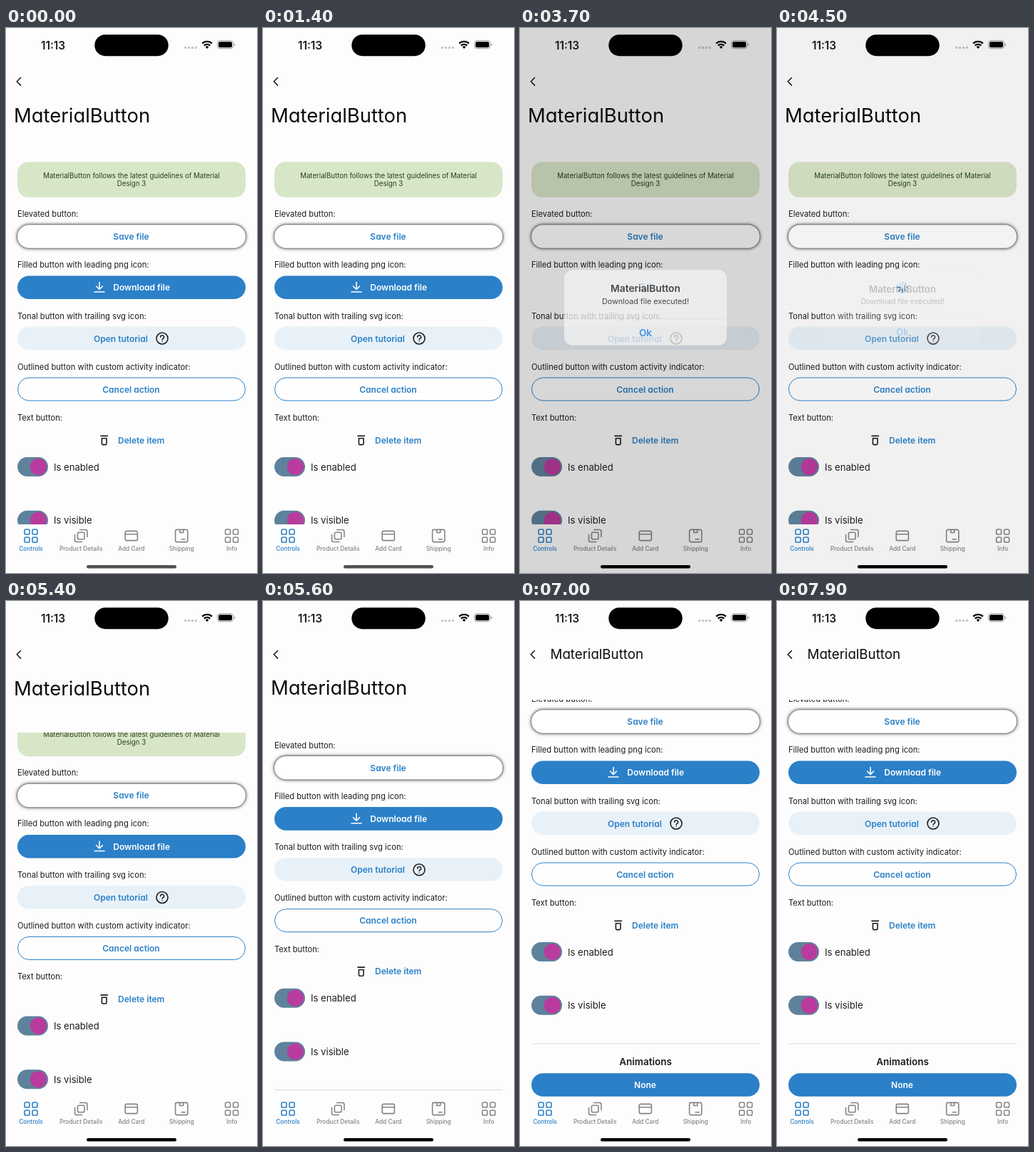
Recreate the animation shown at these times as an HTML page. Size 352 by 762 pixels, loop 8000 ms.

```html
<!DOCTYPE html>
<html lang="en">
<head>
<meta charset="utf-8">
<title>Material button demo</title>
<style>
  html, body { margin: 0; width: 100%; height: 100%; overflow: hidden; background: #fdfdfd; }
  svg { display: block; width: 352px; height: 762px; }
  text { dominant-baseline: central; font-family: Inter, Roboto, sans-serif; fill: #1c1c1e; }
  .mid { text-anchor: middle; }
  .label { font-size: 11.2px; }
  .option { font-size: 13.1px; }
  .brand { font-feature-settings: "cv11"; fill: #0c0c0d; }
  .action { font-size: 12px; font-weight: 600; fill: #2b80c8; font-feature-settings: "cv11"; }
  .note { font-size: 9.7px; fill: #24421a; text-anchor: middle; }
  .white { fill: #fff; }
  .line { fill: none; stroke: #1c1c1e; stroke-width: 1.6; stroke-linecap: round; stroke-linejoin: round; }
  .tab { fill: none; stroke: #858585; stroke-width: 1.6; stroke-linejoin: round; stroke-linecap: round; }
  .tab text { stroke: none; fill: #858585; font-size: 8.3px; font-weight: 500; text-anchor: middle; }
  .tab.on { stroke: #2b80c8; }
  .tab.on text { fill: #2b80c8; }
  .raised { fill: #fff; filter: drop-shadow(0 0 1.2px rgba(0, 0, 0, .6)) drop-shadow(0 0 2.6px rgba(0, 0, 0, .75)); }

  /* Every track shares one 8 s clock. */
  .view, .scroll, .large, .small, .ready, .busy, .dim, .alert, .home { animation: 8s linear infinite; }
  .view { animation-name: view; }
  .scroll { animation-name: scroll; }
  .large { animation-name: large; }
  .small { animation-name: small; }
  .ready { animation-name: ready; animation-timing-function: step-end; }
  .busy { animation-name: busy; animation-timing-function: step-end; }
  .dim { animation-name: fade; }
  .alert { animation-name: fade, zoom; transform-origin: 176px 391px; }
  .home { animation-name: home; }
  .spin { animation: spin 1s steps(8) infinite; transform-origin: 0 0; }

  @keyframes view {
    0%, 70% { clip-path: inset(184px 0 0 0); }
    75%, 100% { clip-path: inset(138px 0 0 0); }
  }
  @keyframes scroll {
    0%, 66.25% { transform: translateY(0); }
    70% { transform: translateY(-58px); animation-timing-function: ease-out; }
    75%, 100% { transform: translateY(-123px); }
  }
  @keyframes large {
    0%, 70% { opacity: 1; transform: translateY(0); }
    73%, 100% { opacity: 0; transform: translateY(-36px); }
  }
  @keyframes small {
    0%, 71.5% { opacity: 0; }
    74%, 100% { opacity: 1; }
  }
  @keyframes ready { 0% { opacity: 1; } 18.75% { opacity: 0; } 60%, 100% { opacity: 1; } }
  @keyframes busy { 0% { opacity: 0; } 18.75% { opacity: 1; } 60%, 100% { opacity: 0; } }
  @keyframes fade {
    0%, 45% { opacity: 0; }
    46.25% { opacity: .77; }
    48.75%, 53.75% { opacity: 1; }
    56.25% { opacity: .23; }
    58.75%, 100% { opacity: 0; }
  }
  @keyframes zoom {
    0%, 45% { transform: scale(.88); }
    46.25% { transform: scale(.942); }
    48.75%, 53.75% { transform: scale(1); }
    56.25% { transform: scale(.906); }
    58.75%, 100% { transform: scale(.88); }
  }
  @keyframes home { 0%, 41.25% { opacity: .68; } 45%, 100% { opacity: 1; } }
  @keyframes spin { to { transform: rotate(360deg); } }
</style>
</head>
<body>
<svg viewBox="0 0 352 762">
  <defs>
    <rect id="pill" x="16" width="320" height="32.6" rx="16.3"/>
    <path id="ray" d="M3.6 0H7.4" stroke="#2b80c8" stroke-width="1.9" stroke-linecap="round"/>
    <g id="switch">
      <rect x="16" y="-13.5" width="43" height="27" rx="13.5" fill="#5f829c"/>
      <circle cx="45.3" r="11.6" fill="#b93b9e"/>
    </g>
    <g id="grid">
      <rect x="-9" y="-9" width="7" height="7" rx="1.8"/>
      <rect x="2" y="-9" width="7" height="7" rx="1.8"/>
      <rect x="-9" y="2" width="7" height="7" rx="1.8"/>
      <rect x="2" y="2" width="7" height="7" rx="1.8"/>
    </g>
  </defs>

  <rect width="352" height="762" fill="#fdfdfd"/>

  <!-- Page content -->
  <g class="view">
    <rect width="352" height="762" fill="#fdfdfd"/>
    <g class="scroll">
      <rect x="16" y="187.3" width="320" height="49.4" rx="15.5" fill="#d8e6c8"/>
      <text class="note" x="176" y="206.5">MaterialButton follows the latest guidelines of Material</text>
      <text class="note" x="176" y="217.5">Design 3</text>

      <text class="label" x="16" y="260">Elevated button:</text>
      <use class="raised" href="#pill" y="275.2"/>
      <text class="action mid" x="175.5" y="291.5">Save file</text>

      <text class="label" x="16" y="331">Filled button with leading png icon:</text>
      <g class="ready">
        <use href="#pill" y="346.4" fill="#2b80c8"/>
        <path d="M131 355.5V365M126.5 361L131 365.5L135.5 361M124 369H138" class="line" style="stroke:#fff"/>
        <text class="action white" x="150.3" y="362.7">Download file</text>
      </g>
      <g class="busy">
        <g transform="translate(176 362.5)">
          <g class="spin">
            <use href="#ray"/>
            <use href="#ray" transform="rotate(-45)" opacity=".85"/>
            <use href="#ray" transform="rotate(-90)" opacity=".7"/>
            <use href="#ray" transform="rotate(-135)" opacity=".55"/>
            <use href="#ray" transform="rotate(-180)" opacity=".43"/>
            <use href="#ray" transform="rotate(-225)" opacity=".35"/>
            <use href="#ray" transform="rotate(-270)" opacity=".3"/>
            <use href="#ray" transform="rotate(-315)" opacity=".25"/>
          </g>
        </g>
      </g>

      <text class="label" x="16" y="402.5">Tonal button with trailing svg icon:</text>
      <use href="#pill" y="417.5" fill="#e8f1f8"/>
      <text class="action" x="123" y="434">Open tutorial</text>
      <circle class="line" cx="219" cy="434" r="8"/>
      <path class="line" style="stroke-width:1.5" d="M216.6 432.2a2.5 2.4 0 1 1 3.7 2q-1.2.7-1.2 1.7M219.1 438.2v.1"/>

      <text class="label" x="16" y="473.5">Outlined button with custom activity indicator:</text>
      <rect x="16.5" y="489" width="319" height="32" rx="16" fill="#fefefe" stroke="#2b80c8"/>
      <text class="action mid" x="175.5" y="505">Cancel action</text>

      <text class="label" x="16" y="545">Text button:</text>
      <path class="line" d="M133 570.4H142.4M134.4 573.8V581Q134.4 582.6 136 582.6H139.4Q141 582.6 141 581V573.8Z"/>
      <text class="action" x="157" y="576">Delete item</text>

      <use href="#switch" y="613.5"/>
      <text class="option" x="67" y="613.5">Is enabled</text>
      <use href="#switch" y="688.3"/>
      <text class="option" x="67" y="688.3">Is visible</text>

      <path d="M16 742H336" stroke="#d9d9d9"/>
      <text class="mid" x="176" y="767" font-size="13.5" font-weight="600">Animations</text>
      <use href="#pill" y="783.2" fill="#2b80c8"/>
      <text class="action mid white" x="175.5" y="799.5">None</text>
    </g>
  </g>

  <!-- Header -->
  <path class="line" d="M20.5 69.5L15.3 74.8L20.5 80.1"/>
  <text class="brand large" x="11" y="121.5" font-size="27.4">MaterialButton</text>
  <text class="brand small" x="42.5" y="74.2" font-size="18.7">MaterialButton</text>

  <!-- Status bar -->
  <text class="mid" x="66" y="24" font-size="15.4" font-weight="600">11:13</text>
  <rect x="124.3" y="9.2" width="103.4" height="30" rx="15"/>
  <path d="M251.7 27.5H268" stroke="#c4c4c6" stroke-width="3.4" stroke-linecap="round" stroke-dasharray="0 4.9"/>
  <g fill="none" stroke="#000" stroke-width="2.3">
    <path d="M275.2 21.6A9.6 9.6 0 0 1 288.8 21.6"/>
    <path d="M277.8 24.6A6 6 0 0 1 286.2 24.6"/>
  </g>
  <path d="M279.7 26.4A3.3 3.3 0 0 1 284.3 26.4L282 28.9Z"/>
  <rect x="296.5" y="17.7" width="22" height="11" rx="3.4" fill="none" stroke="#9a9a9c"/>
  <rect x="298" y="19.2" width="19" height="8" rx="2"/>
  <path d="M319.8 21.2A2.1 2.1 0 0 1 319.8 25.2Z" fill="#9a9a9c"/>

  <!-- Tab bar -->
  <rect y="694" width="352" height="68" fill="#fdfdfd"/>
  <g class="tab on" transform="translate(35 710)">
    <use href="#grid"/>
    <text y="18.2">Controls</text>
  </g>
  <g class="tab" transform="translate(105.2 710)">
    <rect x="-4.8" y="-4.8" width="9.6" height="9.6" rx="1.8"/>
    <path d="M-1.5 -8.5H6.3Q8.7 -8.5 8.7 -6.1V1.5M-8.7 -1.5V6.1Q-8.7 8.5 -6.3 8.5H1.5"/>
    <text y="18.2">Product Details</text>
  </g>
  <g class="tab" transform="translate(175.8 710)">
    <rect x="-8.6" y="-6.6" width="17.2" height="13.2" rx="2.2"/>
    <path d="M-8.5 -2.2H8.5"/>
    <text y="18.2">Add Card</text>
  </g>
  <g class="tab" transform="translate(246.2 710)">
    <rect x="-8.6" y="-8.6" width="17.2" height="17.2" rx="2"/>
    <path d="M-2.5 -8.5V-4.5H2.5V-8.5M0 4.7H5"/>
    <text y="18.2">Shipping</text>
  </g>
  <g class="tab" transform="translate(316.6 710)">
    <use href="#grid"/>
    <text y="18.2">Info</text>
  </g>
  <rect class="home" x="113" y="751" width="126" height="4.4" rx="2.2"/>

  <!-- Alert -->
  <rect class="dim" width="352" height="762" fill-opacity=".2"/>
  <g class="alert">
    <rect x="55" y="335" width="242" height="112" rx="12.5" fill="#f2f2f2"/>
    <path d="M55 407.2H297" stroke="#d2d2d4" stroke-width=".6"/>
    <text class="mid" x="176" y="362.5" font-size="14.6" font-weight="600">MaterialButton</text>
    <text class="mid" x="176" y="381.5" font-size="11.4">Download file executed!</text>
    <text class="mid" x="176" y="428" font-size="14.4" font-weight="600" style="fill:#1583ee">Ok</text>
  </g>
</svg>
</body>
</html>
```
